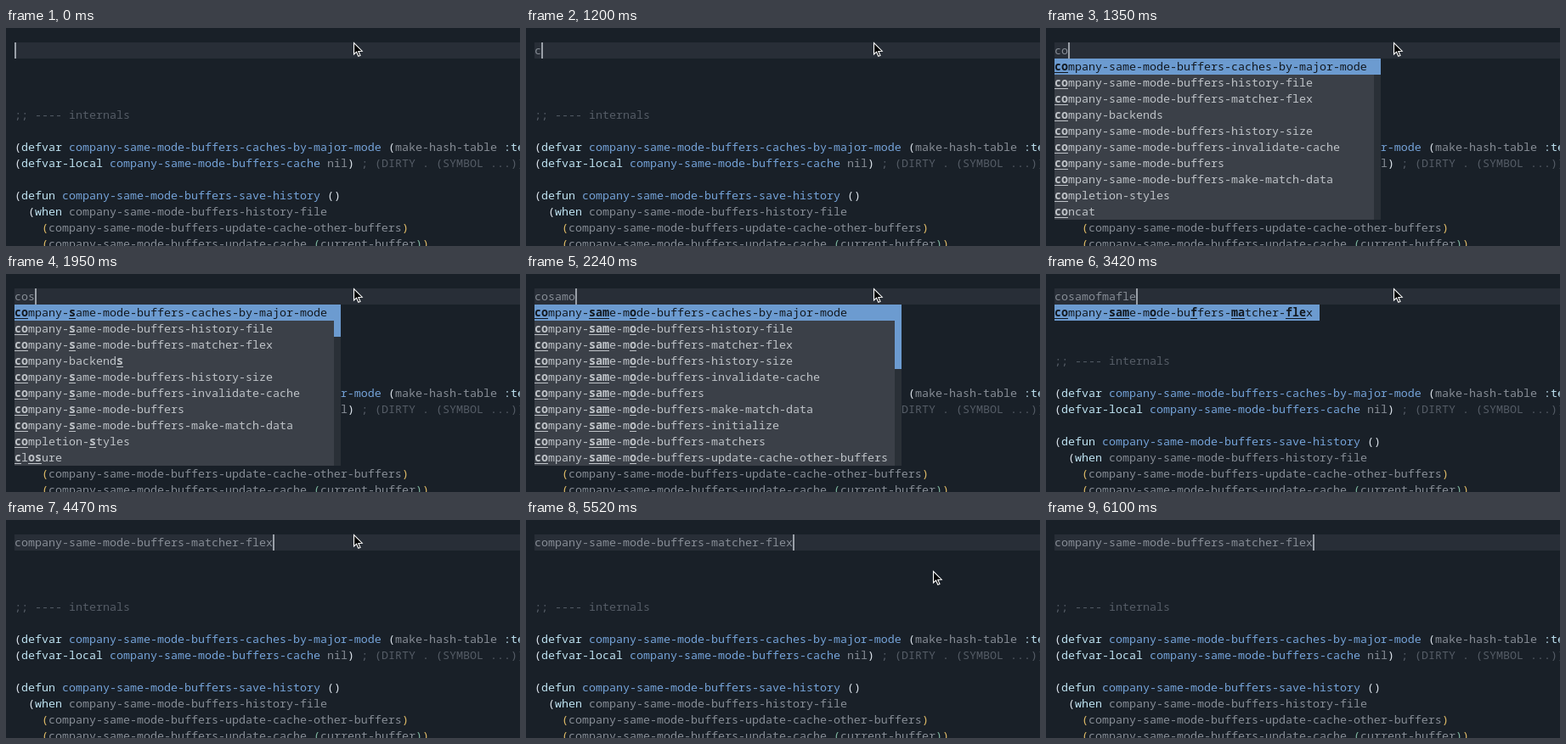
These frames come from a looping animation (605 px wide and 257 px high, 6.25 s). An HTML page with a canvas:

```html
<!DOCTYPE html>
<html lang="en">
<head>
<meta charset="utf-8">
<title>Code completion</title>
<style>
  html, body { margin: 0; width: 100%; height: 100%; overflow: hidden; background: #192028; }
  canvas { display: block; }
</style>
</head>
<body>
<canvas id="stage" width="605" height="257"></canvas>
<script>
const ctx = document.getElementById('stage').getContext('2d');
const LOOP = 6250, LEFT = 10, TOP = 17, CHAR = 8, LINE = 19;
const FONT = '13.3333px "Noto Sans Mono", "Liberation Mono", monospace';

const C = {
  bg: '#192028', line: '#282e37', caret: '#9aa0a8',
  text: '#878d96', dim: '#555c66', key: '#bfe3f2', name: '#75a3d9',
  paren: '#dfe6ee', yellow: '#e3bd68', green: '#7fb8a0',
  menu: '#3b4048', menuText: '#bfc3c8', track: '#2a3037',
  pick: '#6c9bd0', pickText: '#12181f'
};

const pre = 'company-same-mode-buffers';
const own = s => s.split(' ').map(w => pre + '-' + w);

// Each code line: row number, then [colour, text] runs
const code = [
  [4, ['dim', ';; ---- internals']],
  [6, ['paren', '('], ['key', 'defvar '], ['name', pre + '-caches-by-major-mode '],
      ['paren', '('], ['text', 'make-hash-table '], ['key', ':test']],
  [7, ['paren', '('], ['key', 'defvar-local '], ['name', pre + '-cache '], ['text', 'nil'],
      ['paren', ') '], ['dim', '; (DIRTY . (SYMBOL ...))']],
  [9, ['paren', '('], ['key', 'defun '], ['name', pre + '-save-history '], ['paren', '()']],
  [10, ['paren', '  ('], ['key', 'when '], ['text', pre + '-history-file']],
  [11, ['yellow', '    ('], ['text', pre + '-update-cache-other-buffers'], ['yellow', ')']],
  [12, ['yellow', '    ('], ['text', pre + '-update-cache '], ['green', '('],
       ['text', 'current-buffer'], ['green', ')'], ['yellow', ')']]
];

const [caches, file, flex, size, invalid, make, init, matchers, others, subword] = own(
  'caches-by-major-mode history-file matcher-flex history-size invalidate-cache ' +
  'make-match-data initialize matchers update-cache-other-buffers partial-match-subword');
const common = [caches, file, flex, 'company-backends', size, invalid, pre, make, 'completion-styles'];
const same = [caches, file, flex, size, invalid, pre, make, init, matchers];

// bar: height of the scroll thumb in rows, 0 for no scroll bar
const steps = [
  { at: 0, typed: '' },
  { at: 1200, typed: 'c' },
  { at: 1350, typed: 'co', menu: [...common, 'concat'], bar: 1 },
  { at: 1950, typed: 'cos', menu: [...common, 'closure'], bar: 2 },
  { at: 2090, typed: 'cosam', menu: [...same, others], bar: 4 },
  { at: 2240, typed: 'cosamo', menu: [...same, others], bar: 4 },
  { at: 2380, typed: 'cosamof', menu: [...same, subword], bar: 4 },
  { at: 2530, typed: 'cosamofma', bar: 0,
    menu: [caches, flex, make, matchers, ...own('matcher-basic matcher-partial'), subword] },
  { at: 3420, typed: 'cosamofmafle', menu: [flex], bar: 0 },
  { at: 4470, typed: flex }
];

const pointer = [
  { at: 0, x: 409, y: 17 },
  { at: 5520, x: 479, y: 60 },
  { at: 5660, x: 541, y: 131 },
  { at: 5810, x: 545, y: 197 },
  { at: 5960, x: 550, y: 247 },
  { at: 6100, hidden: true }
];

const current = (list, t) => list.filter(s => s.at <= t).pop();
const colX = col => LEFT + col * CHAR;
const rowY = row => TOP + row * LINE;

function box(color, x, y, w, h) {
  ctx.fillStyle = color;
  ctx.fillRect(x, y, w, h);
}

function write(text, col, row, color, bold) {
  ctx.font = (bold ? 'bold ' : '') + FONT;
  ctx.fillStyle = color;
  ctx.fillText(text, colX(col), rowY(row) + 14);
}

function drawCode() {
  for (const [row, ...runs] of code) {
    let col = 0;
    for (const [color, text] of runs) {
      write(text, col, row, C[color]);
      col += text.length;
    }
  }
}

// Typed letters are matched in order and shown bold and underlined
function drawItem(item, row, typed, color) {
  let next = 0, start = 0;
  const hits = [...item].map(ch => ch === typed[next] && ++next > 0);
  for (let i = 1; i <= item.length; i++) {
    if (i < item.length && hits[i] === hits[start]) continue;
    write(item.slice(start, i), start, row, color, hits[start]);
    if (hits[start]) box(color, colX(start), rowY(row) + 16, (i - start) * CHAR, 1);
    start = i;
  }
}

function drawMenu({ menu, bar, typed }) {
  const width = (Math.max(...menu.map(s => s.length)) + 1) * CHAR;
  const y = rowY(1), height = menu.length * LINE;
  box(C.menu, LEFT, y, width, height);
  box(C.pick, LEFT, y, width, LINE);
  if (bar) {
    box(C.track, LEFT + width, y, CHAR, height);
    box(C.pick, LEFT + width, y, CHAR, bar * LINE);
  }
  menu.forEach((s, i) => drawItem(s, i + 1, typed, i ? C.menuText : C.pickText));
}

function drawPointer({ x, y }) {
  const tip = [[.5, .5], [.5, 14], [3.6, 11.2], [5.8, 16.3], [8, 15.4], [5.8, 10.4], [10.2, 10.2]];
  ctx.beginPath();
  tip.forEach(([dx, dy]) => ctx.lineTo(x + dx, y + dy));
  ctx.closePath();
  ctx.fillStyle = '#000';
  ctx.fill();
  ctx.strokeStyle = '#fff';
  ctx.lineWidth = 1.1;
  ctx.stroke();
}

function draw(t) {
  const step = current(steps, t), mouse = current(pointer, t);
  box(C.bg, 0, 0, 605, 257);
  box(C.line, LEFT, TOP, 595, LINE);
  drawCode();
  write(step.typed, 0, 0, C.text);
  box(C.caret, colX(step.typed.length), TOP, 2, LINE);
  if (step.menu) drawMenu(step);
  if (!mouse.hidden) drawPointer(mouse);
}

const begin = performance.now();
function tick() {
  draw((performance.now() - begin) % LOOP);
  requestAnimationFrame(tick);
}
tick();
</script>
</body>
</html>
```
